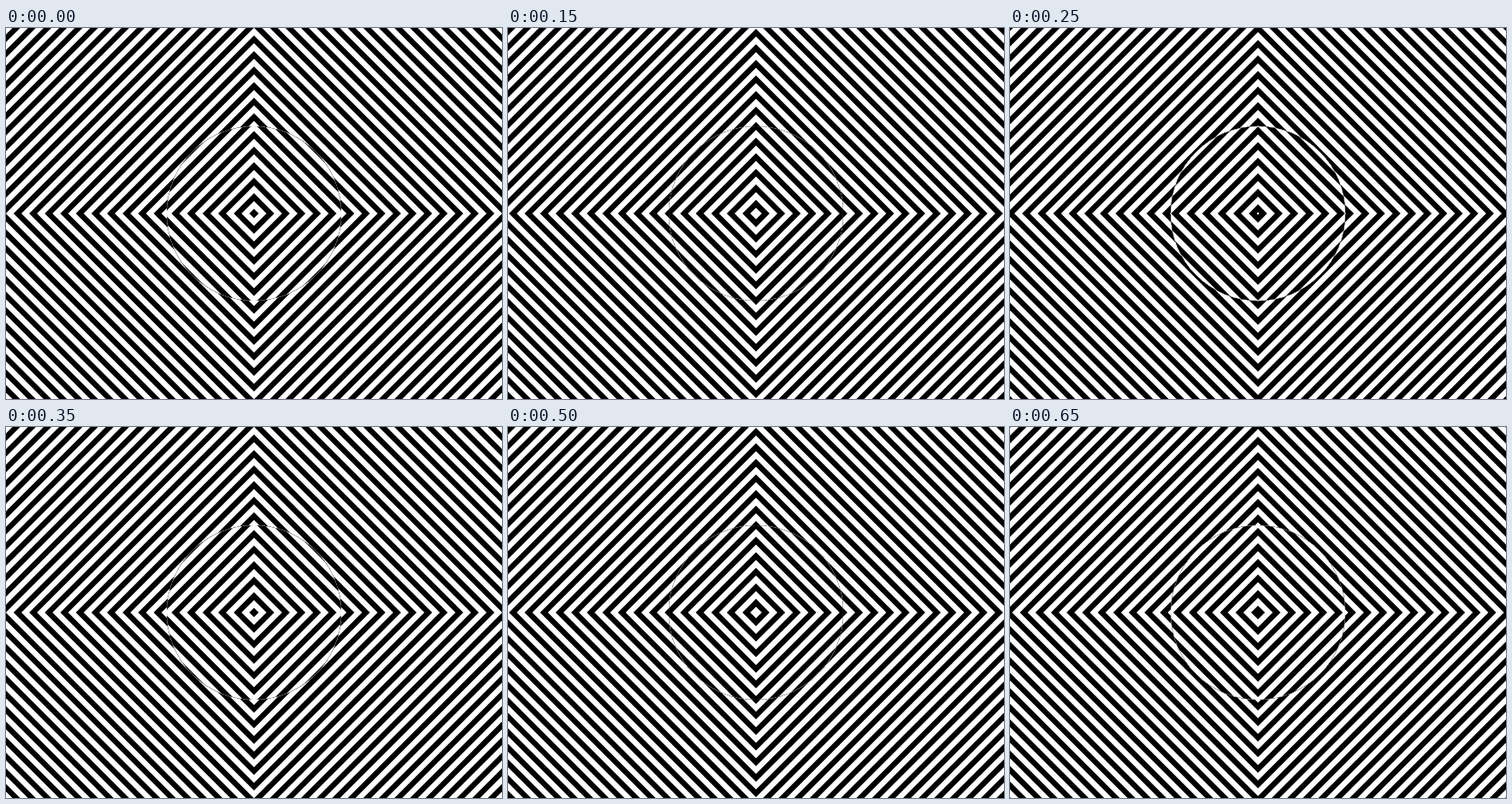
Animation, 580 px wide and 434 px high, one loop 0.7 s. Source, as an HTML page with a canvas:

```html
<!DOCTYPE html>
<html lang="en">
<head>
<meta charset="utf-8">
<title>Diamond waves</title>
<style>
  html, body { margin: 0; width: 100%; height: 100%; overflow: hidden; background: #fff; }
  canvas { display: block; width: 580px; height: 434px; }
</style>
</head>
<body>
<canvas id="stage" width="580" height="434"></canvas>
<script>
const ctx = document.getElementById('stage').getContext('2d');
const W = 580, H = 434, CX = W / 2, CY = H / 2;
const PERIOD = 18.2, STEPS = 7, STEP_MS = 50;
const START = 8.1;              // reach of the innermost outer-field diamond at time 0
const DISC = 102;

function diamond(r, color) {
  if (r <= 0) return;
  ctx.fillStyle = color;
  ctx.beginPath();
  ctx.moveTo(CX, CY - r);
  ctx.lineTo(CX + r, CY);
  ctx.lineTo(CX, CY + r);
  ctx.lineTo(CX - r, CY);
  ctx.fill();
}

// Nested diamonds, painted from the outside in
function bands(phase) {
  ctx.fillStyle = '#fff';
  ctx.fillRect(0, 0, W, H);
  for (let r = phase % PERIOD + PERIOD * 29; r > 0; r -= PERIOD) {
    diamond(r, '#000');
    diamond(r - PERIOD / 2, '#fff');
  }
}

function draw(step) {
  const move = PERIOD / STEPS;
  bands(START + step * move);

  // Inside the disc the bands run inwards
  ctx.save();
  ctx.beginPath();
  ctx.arc(CX, CY, DISC, 0, Math.PI * 2);
  ctx.clip();
  bands(START + (STEPS - 1 - step) * move);
  ctx.restore();
}

let shown = -1;
function tick() {
  const step = Math.floor(performance.now() / STEP_MS) % STEPS;
  if (step !== shown) draw(shown = step);
  requestAnimationFrame(tick);
}
tick();
</script>
</body>
</html>
```
